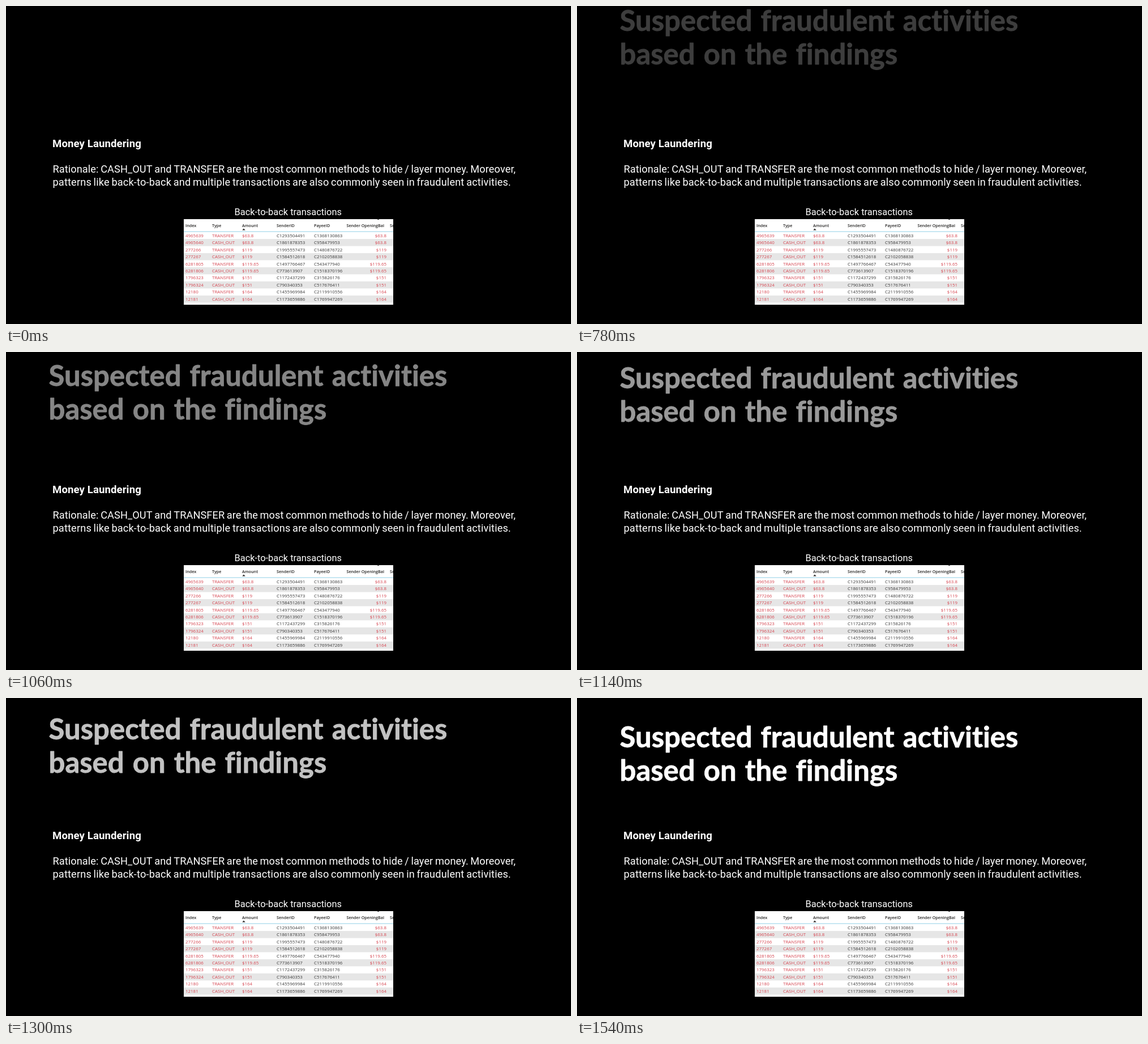
These frames come from a looping animation (998x561 px, 2000 ms). An HTML page with a canvas:

```html
<!DOCTYPE html>
<html lang="en">
<head>
<meta charset="utf-8">
<title>Suspected fraudulent activities</title>
<style>
html, body { margin: 0; width: 100%; height: 100%; overflow: hidden; background: #000; }
canvas { display: block; }
</style>
</head>
<body>
<canvas id="stage" width="998" height="561"></canvas>
<script>
const ctx = document.getElementById("stage").getContext("2d");

const LOOP = 2000, STEP = 40;
const FADE_FROM = 540, FADE_TIME = 1000, FIRST_SHOWN = 620;
const DROP = 56.1;

const RED = "#d64550", DARK = "#3a3a3a", INK = "#252423";
const CELL = "7.95px 'Open Sans', sans-serif";
const HEAD = "600 7.2px 'Open Sans', sans-serif";
const BODY = "18.2px Roboto, sans-serif";
const TITLE = "bold 50.8px Lato, sans-serif";

const table = { x: 314, y: 376, w: 370, h: 151, firstRow: 398.6, pitch: 12.46 };
const columns = { Index: 317, Type: 364, Amount: 417, SenderID: 478, PayeeID: 544 };

// index, amount, sender, payee
const rows = `4965639 $63.8 C1293504491 C1368130863
4965640 $63.8 C1861878353 C958479953
277266 $119 C1995557473 C1480876722
277267 $119 C1584512618 C2102058838
6281805 $119.65 C1497766467 C543477940
6281806 $119.65 C773613907 C1518370196
1796323 $151 C1172437299 C315826176
1796324 $151 C790340353 C517676411
12180 $164 C1455969984 C2119910556
12181 $164 C1173659886 C1769947269`.split("\n").map(row => row.split(" "));

function text(str, x, y, font, color, { align = "left", track = 0, word = 0, outline = 0 } = {}) {
  ctx.font = font;
  ctx.fillStyle = ctx.strokeStyle = color;
  ctx.textAlign = align;
  ctx.letterSpacing = track + "px";
  ctx.wordSpacing = word + "px";
  ctx.fillText(str, x, y);
  if (outline) {
    ctx.lineWidth = outline;
    ctx.lineJoin = "round";
    ctx.strokeText(str, x, y);
  }
}

function rect(x, y, w, h, color) {
  ctx.fillStyle = color;
  ctx.fillRect(x, y, w, h);
}

function drawTitle(t) {
  if (t < FIRST_SHOWN) return;
  const time = FIRST_SHOWN + Math.floor((t - FIRST_SHOWN) / STEP) * STEP;
  const p = Math.min(1, (time - FADE_FROM) / FADE_TIME);
  const lift = DROP * (1 - p);
  const level = Math.round(255 * p);
  const color = `rgb(${level}, ${level}, ${level})`;
  const style = { track: 0.06, word: 2.6, outline: 0.8 };
  text("Suspected fraudulent activities", 75.5, 86.5 - lift, TITLE, color, style);
  text("based on the findings", 75.5, 145.5 - lift, TITLE, color, style);
}

function drawBody() {
  text("Money Laundering", 82, 248.5, "bold 18.6px Roboto, sans-serif", "#fff", { track: 0.1 });
  text("Rationale: CASH_OUT and TRANSFER are the most common methods to hide / layer money. Moreover,",
    82.5, 294, BODY, "#fff", { track: 0.08, word: -1 });
  text("patterns like back-to-back and multiple transactions are also commonly seen in fraudulent activities.",
    82.5, 317, BODY, "#fff", { track: 0.15, word: -1 });
  text("Back-to-back transactions", 403.5, 369, "16.4px Roboto, sans-serif", "#fff");
}

function drawTable() {
  const { x, y, w, h, firstRow, pitch } = table;
  ctx.save();
  ctx.beginPath();
  ctx.rect(x, y, w, h);
  ctx.clip();
  rect(x, y, w, h, "#fff");
  rect(656, y, 3, 1, "#444");

  for (const [name, left] of Object.entries(columns)) text(name, left, 389.5, HEAD, INK);
  text("Sender OpeningBal", 668, 389.5, HEAD, INK, { align: "right" });
  text("Sender", 678, 389.5, HEAD, INK);

  ctx.fillStyle = INK;
  ctx.beginPath();
  ctx.moveTo(417.3, 395.5);
  ctx.lineTo(420, 392.5);
  ctx.lineTo(422.7, 395.5);
  ctx.fill();
  rect(x, 397.5, w, 1, "#8fd0e8");

  rows.forEach(([index, amount, sender, payee], i) => {
    const top = firstRow + i * pitch;
    const base = top + 9.1;
    if (i % 2) rect(x, top, w, pitch, "#e6e6e6");
    text(index, columns.Index, base, CELL, RED);
    text(i % 2 ? "CASH_OUT" : "TRANSFER", columns.Type, base, CELL, RED);
    text(amount, columns.Amount, base, CELL, RED);
    text(sender, columns.SenderID, base, CELL, DARK);
    text(payee, columns.PayeeID, base, CELL, DARK);
    text(amount, 672, base, CELL, RED, { align: "right" });
  });
  ctx.restore();
}

function frame() {
  rect(0, 0, 998, 561, "#000");
  drawBody();
  drawTable();
  drawTitle(performance.now() % LOOP);
  requestAnimationFrame(frame);
}
frame();
</script>
</body>
</html>
```
